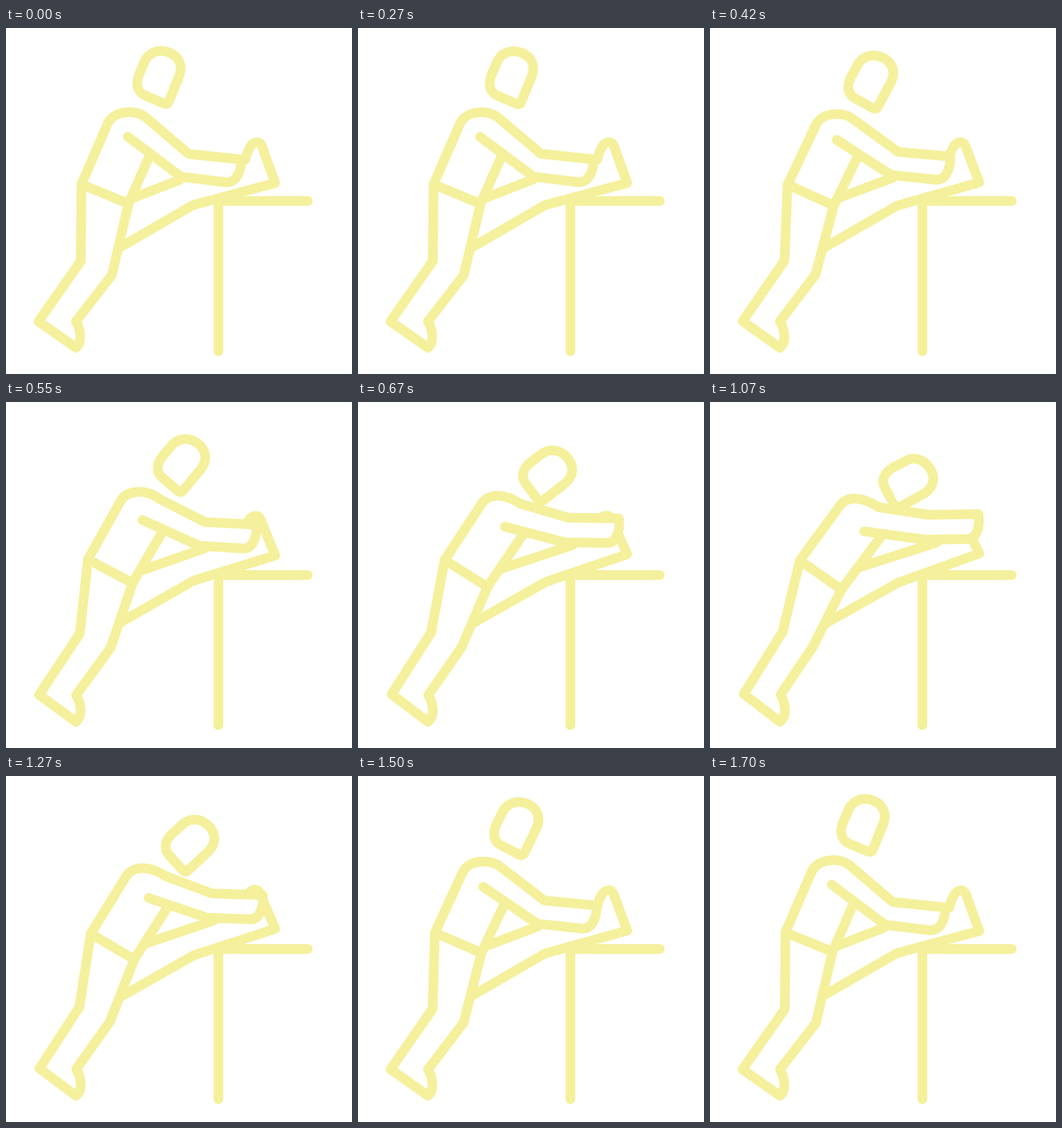
These frames come from a looping animation (500 px wide and 500 px high, 1720 ms). An HTML page:

```html
<!DOCTYPE html>
<html>
<head>
<meta charset="utf-8">
<title>Leg stretch</title>
<style>
  html, body { margin: 0; width: 100%; height: 100%; overflow: hidden; background: #fff; }
  svg { display: block; width: 100%; height: 100%; }
  path { fill: none; stroke: #f5f09c; stroke-width: 14; stroke-linecap: round; stroke-linejoin: round; }
  #arm { fill: #fff; }
</style>
</head>
<body>
<svg viewBox="0 0 500 500">
  <path d="M436 250H307V467"/>
  <path id="rearLeg"/>
  <path id="frontLeg"/>
  <path id="thigh"/>
  <path id="arm"/>
  <path id="torso"/>
  <path id="head" d="M2 -1L17 -38C24 -56 15 -69 0 -73.5C-15 -78 -28 -71 -33 -59L-41 -40C-47 -24 -41 -14 -31 -10L-5 1Q0 3 2 -1Z"/>
</svg>
<script>
const LOOP = 1720, PEAK = 945, HALF = 740;

// Each part: upright pose, leaning pose
const parts = {
  rearLeg: [
    "M109 226L108 337L47 424L101 462C109 456 110 440 101 424L153 357L177 254",
    "M130 229L105 332L49 422L101 462C110 456 111 440 102 423L149 353L190 271"
  ],
  frontLeg: [
    "M163 318L270 256L389 224L370 171C366 162 358 165 354 170Q349 177 346 190",
    "M167 320L272 261L389 219L365 168C361 161 353 164 349 169Q342 176 340 188"
  ],
  thigh: ["M180 247L252 219", "M215 239L328 203"],
  arm: [
    "M109 226L147 138C155 120 187 116 203 130L264 182L340 190C340 205 334 224 318 223L253 215L176 157",
    "M130 229L187 151C198 134 220 137 244 152L316 163L388 162C391 182 384 198 373 198L311 199L223 187"
  ],
  torso: ["M109 226L177 254L208 183", "M130 229L190 271L246 196"]
};

const mix = (a, b, k) => a + (b - a) * k;

function mixPath([from, to], k) {
  const target = to.match(/\d+/g);
  let i = 0;
  return from.replace(/\d+/g, n => mix(+n, +target[i++], k).toFixed(2));
}

function ease(u) {
  const a = u * u, b = (1 - u) * (1 - u);
  return a / (a + b);
}

function draw(now) {
  const t = now % LOOP;
  const lean = 1.04 * ease(Math.max(0, 1 - Math.abs(t - PEAK) / HALF));
  for (const id in parts)
    document.getElementById(id).setAttribute("d", mixPath(parts[id], lean));
  // The head swings forward along a slight arc
  const arc = 4 * lean * (1 - lean);
  const x = mix(233, 271, lean) + 3 * arc, y = mix(108, 152, lean) + arc;
  document.getElementById("head").setAttribute("transform",
    `translate(${x} ${y}) rotate(${39 * lean})`);
}

const start = performance.now();
function tick() {
  draw(performance.now() - start);
  requestAnimationFrame(tick);
}
tick();
</script>
</body>
</html>
```
